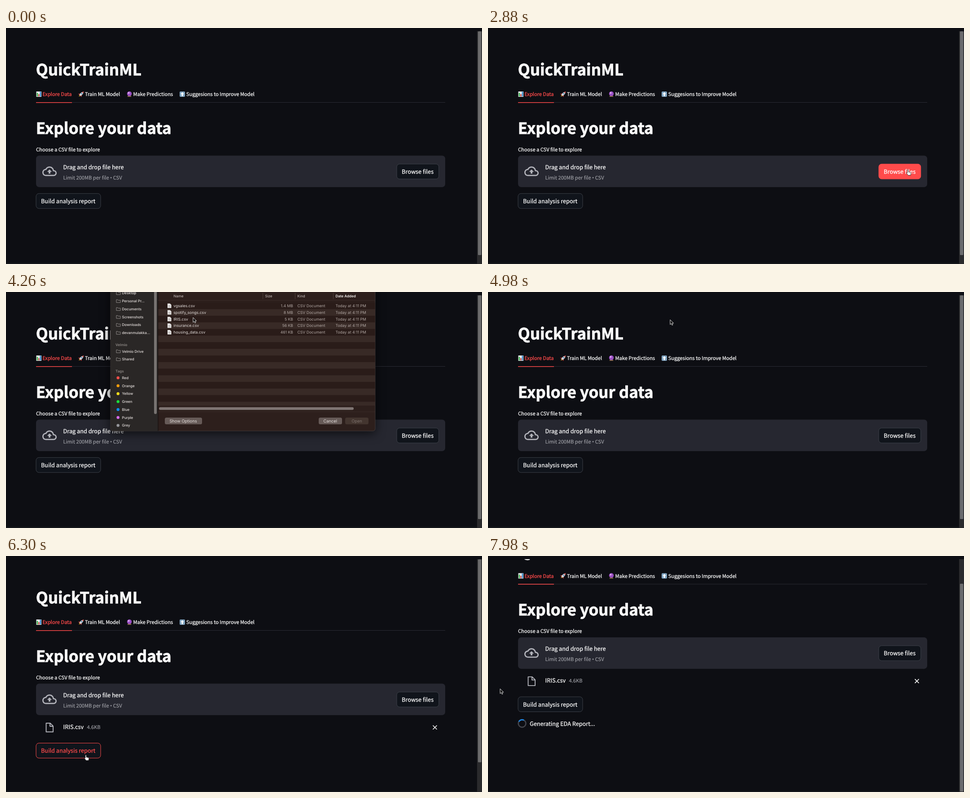
Animation, 1061 px wide and 528 px high, one loop 8 s. Source, as an HTML page:

```html
<!DOCTYPE html>
<html lang="en">
<head>
<meta charset="utf-8">
<title>QuickTrainML</title>
<style>
html, body { margin: 0; width: 100%; height: 100%; overflow: hidden; background: #0d0e13; }
svg { display: block; width: 100vw; height: 100vh; }
text { text-rendering: geometricPrecision; }
#page text {
  font: 12.71px "Noto Sans CJK SC", "Noto Sans CJK JP", "Noto Sans CJK", "Open Sans", sans-serif;
  color: #fafafa; fill: currentColor; stroke: currentColor; stroke-width: .3;
}
#page .small { font-size: 11.12px; }
#page .title { font-size: 34.94px; font-weight: 700; stroke-width: .8; }
#page .dim { color: #a2a3a9; stroke-width: .15; }
#page .red { color: #ff4b4b; }
.bullet { font-family: "Open Sans", sans-serif; }
.btn rect { fill: #10141b; stroke: #3d4149; }
.hot rect { stroke: #ff4b4b; }
#page .hot text { color: #ff4b4b; }
.press rect { fill: #ff4b4b; stroke: #ff4b4b; }
#page .press text { color: #fff; }
#dialog { filter: drop-shadow(0 5px 11px rgba(0, 0, 0, .65)); }
#dialog text { font: 8.65px Inter, "Liberation Sans", sans-serif; fill: #e6e0de; }
#dialog .side { font-size: 8px; font-weight: 500; }
#dialog .head { font-size: 8px; fill: #cfc6c3; }
#dialog .bold { font-weight: 600; fill: #f2eeec; }
#dialog .group { font-size: 8px; font-weight: 600; fill: #8a8582; }
#dialog .info { fill: #b3a9a5; }
#dialog .end { text-anchor: end; }
#dialog .ctl { font-size: 9.3px; text-anchor: middle; }
#dialog .off { fill: #7d716d; }
#dialog .picked text { fill: #fff; }
</style>
</head>
<body>
<svg viewBox="0 0 1061 528" preserveAspectRatio="none">
  <rect width="1061" height="528" fill="#0d0e13"/>
  <g id="page">
    <text class="title" x="66.8" y="106">QuickTrainML</text>

    <g id="bars">
      <rect x="67.5" y="142" width="11.5" height="12" fill="#e8ecef"/>
      <path d="M70 153v-8" stroke="#3fae49" stroke-width="2.6"/>
      <path d="M73.3 153v-5" stroke="#d8463c" stroke-width="2.4"/>
      <path d="M76.8 153v-10.5" stroke="#2d83c9" stroke-width="2.6"/>
    </g>
    <g id="rocket" transform="translate(168 147.5) rotate(45)">
      <path d="M-2.5 1L-5 5l3-.5zM2.5 1L5 5l-3-.5z" fill="#d8403a"/>
      <path d="M0-7.5Q3.5-3 2.2 4.5h-4.4Q-3.5-3 0-7.5z" fill="#cfd6dc"/>
      <path d="M0-7.5l2 3.5h-4z" fill="#d8403a"/>
      <circle cy="-1" r="1.3" fill="#3b6f9e"/>
      <path d="M-1.5 4.7h3L0 8z" fill="#f5a623"/>
    </g>
    <g id="ball">
      <path d="M270.5 154l1.5-3h6l1.5 3z" fill="#8a6a4a"/>
      <circle cx="275" cy="147" r="5.2" fill="#9a4fc4"/>
      <circle cx="273.5" cy="145.3" r="2" fill="#dba8ee"/>
    </g>
    <g id="up">
      <rect x="387" y="142" width="12" height="12" rx="2" fill="#7fa3c0"/>
      <path d="M393 143.5l4 4.5h-2.5v4.5h-3V148H389z" fill="#fff"/>
    </g>
    <text class="small red" x="81.2" y="152.4">Explore Data</text>
    <text class="small" x="176" y="152.4">Train ML Model</text>
    <text class="small" x="283.5" y="152.4">Make Predictions</text>
    <text class="small" x="401.8" y="152.4">Suggesions to Improve Model</text>
    <rect x="67" y="166" width="912" height="1" fill="#2b2c34"/>
    <rect x="67" y="166" width="80" height="1.5" fill="#ff4b4b"/>

    <text class="title" x="66.8" y="237">Explore your data</text>
    <text class="small" x="66.9" y="275.7">Choose a CSV file to explore</text>
    <rect x="67" y="285.5" width="912" height="70.5" rx="7" fill="#262730"/>
    <path transform="translate(81 304.5) scale(1.333)" fill="#b4b5bc" d="M19.35 10.04C18.67 6.59 15.64 4 12 4 9.11 4 6.6 5.64 5.35 8.04 2.34 8.36 0 10.91 0 14c0 3.31 2.69 6 6 6h13c2.76 0 5-2.24 5-5 0-2.64-2.05-4.78-4.65-4.96zM19 18H6c-2.21 0-4-1.79-4-4 0-2.05 1.53-3.76 3.56-3.97l1.07-.11.5-.95C8.08 7.14 9.94 6 12 6c2.62 0 4.88 1.86 5.39 4.43l.3 1.5 1.53.11c1.56.1 2.78 1.41 2.78 2.96 0 1.65-1.35 3-3 3zM8 13h2.55v3h2.9v-3H16l-4-4z"/>
    <text x="127.6" y="316">Drag and drop file here</text>
    <text class="small dim" x="127.4" y="338.5">Limit 200MB per file <tspan class="bullet">•</tspan> CSV</text>
    <g id="browse" class="btn">
      <rect x="871" y="304.3" width="93.7" height="33.5" rx="6.5"/>
      <text x="882.1" y="325.5">Browse files</text>
    </g>
    <g id="file">
      <path d="M89.5 374h9l6.5 6.5v13h-15.5zM98 374v7h7" fill="none" stroke="#b4b5bc" stroke-width="1.9" stroke-linejoin="round"/>
      <text x="127.6" y="386.8">IRIS.csv</text>
      <text class="small dim" x="180.6" y="386.8">4.6KB</text>
      <path d="M951.5 379l9 9m0-9l-9 9" stroke="#fafafa" stroke-width="1.6"/>
    </g>
    <g id="build" class="btn">
      <rect x="67" y="370.3" width="144" height="33.5" rx="6.5"/>
      <text x="77.9" y="392">Build analysis report</text>
    </g>
    <g id="busy">
      <circle cx="76" cy="478.3" r="8.4" fill="none" stroke="#43454c" stroke-width="2.7"/>
      <path id="arc" d="M-5.94-5.94A8.4 8.4 0 0 1 5.94-5.94" fill="none" stroke="#1c83e1" stroke-width="2.7"/>
      <text x="92.9" y="483.3">Generating EDA Report...</text>
    </g>
  </g>

  <rect width="1050" height="7" fill="#0d0e13"/>
  <rect y="525.5" width="1061" height="2.5" fill="#17181c"/>
  <rect x="1050" y="7" width="11" height="521" fill="#2a2a2c"/>
  <rect id="thumb" x="1052" width="7.5" rx="1.5" fill="#6c6c6d"/>

  <g id="dialog">
    <path d="M233-60H823V305q0 6-6 6H239q-6 0-6-6z" fill="#2d1f1c" stroke="#57504d" stroke-width=".6"/>
    <path d="M233.3-60H339V310.7H239q-5.7 0-5.7-6z" fill="#2a2726"/>
    <path d="M339-60V311" stroke="#120c0b"/>
    <rect x="330" y="-60" width="6" height="333" rx="3" fill="#777371"/>
    <g id="list"></g>
    <path d="M339 18.5H823M339 253.5H823M339 268H823" stroke="#40322e" stroke-width=".7"/>
    <path d="M572.5 2V16M644.5 2V16M729.5 2V16" stroke="#55463f" stroke-width=".8"/>
    <rect x="341" y="257.8" width="434" height="6" rx="3" fill="#7f7573"/>
    <text class="head" x="373.5" y="12">Name</text>
    <text class="head" x="577.5" y="12">Size</text>
    <text class="head" x="649.5" y="12">Kind</text>
    <text class="head bold" x="734.5" y="12">Date Added</text>
    <g id="side"></g>
    <rect x="354" y="281" width="83" height="15" rx="3.5" fill="#665a57"/>
    <text class="ctl" x="395" y="291.9">Show Options</text>
    <rect x="697" y="281" width="52" height="15" rx="3.5" fill="#665a57"/>
    <text class="ctl" x="722.7" y="291.9">Cancel</text>
    <g id="open">
      <rect x="756" y="281" width="52" height="15" rx="3.5"/>
      <text class="ctl off" x="782" y="291.9">Open</text>
    </g>
  </g>

  <g id="cursor">
    <path id="arrow" d="M0 0V10.8L2.5 8.5 4.2 12.3 6 11.5 4.4 7.8H7.7z" fill="#0a0a0a" stroke="#f4f4f4" stroke-width=".9"/>
    <path id="hand" d="M-1.2 1.3c0-1.8 2.3-1.8 2.3 0V5l4.2.9q1.8.5 1.5 2.3L6 12.5H.6L-2.8 8.2q-.9-1.7.6-1.7l1 .8z" fill="#fff" stroke="#111" stroke-width=".8"/>
  </g>
</svg>
<script>
const $ = id => document.getElementById(id);
const show = (id, on) => $(id).setAttribute("display", on ? "inline" : "none");
const move = (id, x, y, more = "") => $(id).setAttribute("transform", `translate(${x} ${y}) ${more}`);
const label = (x, y, cls, s) => `<text class="${cls}" x="${x}" y="${y}">${s}</text>`;

// File list: striped rows, the first five filled
const files = [["vgsales", "1.4 MB"], ["spotify_songs", "8 MB"], ["IRIS", "5 KB"],
  ["insurance", "56 KB"], ["housing_data", "461 KB"]];
const rowH = 14.8, rowTop = 23.6;
for (let i = 0; i < 16; i++) {
  const y = rowTop + i * rowH, h = Math.min(rowH, 253 - y), b = y + 10.4;
  let row = `<rect x="339.5" y="${y}" width="483" height="${h}" fill="${i % 2 ? "#382a26" : "#2a1c19"}"/>`;
  if (i === 2) row += `<rect id="mark" x="340" y="${y}" width="482.5" height="${h}" fill="#0a58cf"/>`;
  if (files[i]) {
    const [name, size] = files[i];
    row += `<path d="M360 ${y + 2.2}h5.5l3 3v7h-8.5z" fill="#e9e7e6"/>
      <path d="M361.5 ${y + 7}h5.5m-5.5 2.2h5.5" stroke="#8d8987" stroke-width=".7"/>` +
      label(373.3, b, "", name + ".csv") + label(640, b, "info end", size) +
      label(649.5, b, "info", "CSV Document") + label(734.5, b, "info", "Today at 4:11 PM");
  }
  $("list").innerHTML += `<g id="row${i}">${row}</g>`;
}

// Sidebar
const gap = 17.75;
const folder = y => `<path d="M246 ${y - 6}h3l1 1.3h5v5.2h-9z" fill="none" stroke="#aaa5a2" stroke-width=".8"/>`;
const places = (top, names) => names.map((s, i) =>
  folder(top + i * gap) + label(258.5, top + i * gap, "side", s)).join("");
const tags = { Red: "#ff4f4a", Orange: "#ff9f0a", Yellow: "#ffe01b", Green: "#1be03a",
  Blue: "#0a90ff", Purple: "#d86cf0", Grey: "#98989d" };
$("side").innerHTML =
  places(5.4, ["Desktop", "Personal Pr...", "Documents", "Screenshots", "Downloads", "devanmulakka..."]) +
  label(244, 121, "group", "Velmio") + places(135.5, ["Velmio Drive", "Shared"]) +
  label(244, 180, "group", "Tags") +
  Object.keys(tags).map((s, i) => `<circle cx="249.7" cy="${192 + i * gap}" r="3.2" fill="${tags[s]}"/>` +
    label(258.5, 194.8 + i * gap, "side", s)).join("");

// Pointer path: time, x, y
const path = [
  [1470, 7, 522], [1650, 190, 470], [1850, 520, 395], [2050, 800, 338], [2250, 933, 318], [2340, 936, 317],
  [3180, 936, 317], [3360, 738, 305],
  [3570, 738, 305], [3720, 650, 235], [3920, 500, 105], [4110, 426, 42], [4260, 417, 57], [4350, 413, 60],
  [4410, 413, 60], [4590, 406, 62],
  [5520, 406, 62], [5660, 290, 180], [5800, 130, 350], [5950, 36, 490], [6100, 90, 480], [6210, 155, 455],
  [6300, 178, 445], [6600, 178, 445], [6800, 128, 385], [7050, 88, 336],
  [7140, 88, 336], [7300, 50, 312], [7450, 27, 297]
];
function pointer(t) {
  const i = path.findIndex(p => p[0] > t);
  if (i < 0) return path[path.length - 1].slice(1);
  if (!i) return [-50, -50];
  const [t0, x0, y0] = path[i - 1], [t1, x1, y1] = path[i], k = (t - t0) / (t1 - t0);
  return [x0 + (x1 - x0) * k, y0 + (y1 - y0) * k];
}
const ramp = (t, a, b) => Math.min(1, Math.max(0, (t - a) / (b - a)));
const between = (t, a, b) => t >= a && t < b;

function draw(now) {
  const t = now % 8000;
  const [x, y] = pointer(t);
  const loaded = t >= 5070, busy = t >= 6480, dialog = between(t, 3180, 4980);
  const k = 1 - (1 - ramp(t, 7350, 7920)) ** 3, scroll = 103.6 * k;
  const shift = loaded ? 48.3 : 0;
  const inside = (l, top, r, b) => !dialog && x >= l && x <= r && y + scroll >= top && y + scroll <= b;

  move("page", 0, -scroll);
  move("build", 0, shift);
  show("file", loaded);
  show("busy", busy);
  move("arc", 76, 478.3, `rotate(${(t - 7080) * .36 + 20})`);

  const onBrowse = inside(871, 304, 965, 338);
  const onBuild = inside(67, 370 + shift, 211, 404 + shift);
  const style = (id, hot, press) => $(id).setAttribute("class", "btn" + (press ? " press" : hot ? " hot" : ""));
  style("browse", onBrowse, between(t, 2880, 2970));
  style("build", onBuild, between(t, 6360, 6450));

  const top = 7.5 + 54.5 * k, bottom = busy ? 432 + 95 * k : loaded ? 461.5 : 508;
  $("thumb").setAttribute("y", top);
  $("thumb").setAttribute("height", bottom - top);

  show("dialog", dialog);
  const opening = ramp(t, 3150, 3360);
  move("dialog", 0, -40 * (1 - opening) ** 2);
  $("dialog").setAttribute("opacity", opening);
  const picked = t >= 4770;
  show("mark", picked);
  for (const id of ["row2", "open"]) $(id).setAttribute("class", picked ? "picked" : "");
  $("open").setAttribute("fill", picked ? "#0a62dc" : "#43352f");

  const hand = onBrowse || onBuild || inside(67, 285, 979, 356);
  move("cursor", x, y);
  show("hand", hand);
  show("arrow", !hand);
  requestAnimationFrame(draw);
}
const start = performance.now();
requestAnimationFrame(now => draw(Math.max(0, now - start)));
</script>
</body>
</html>
```
